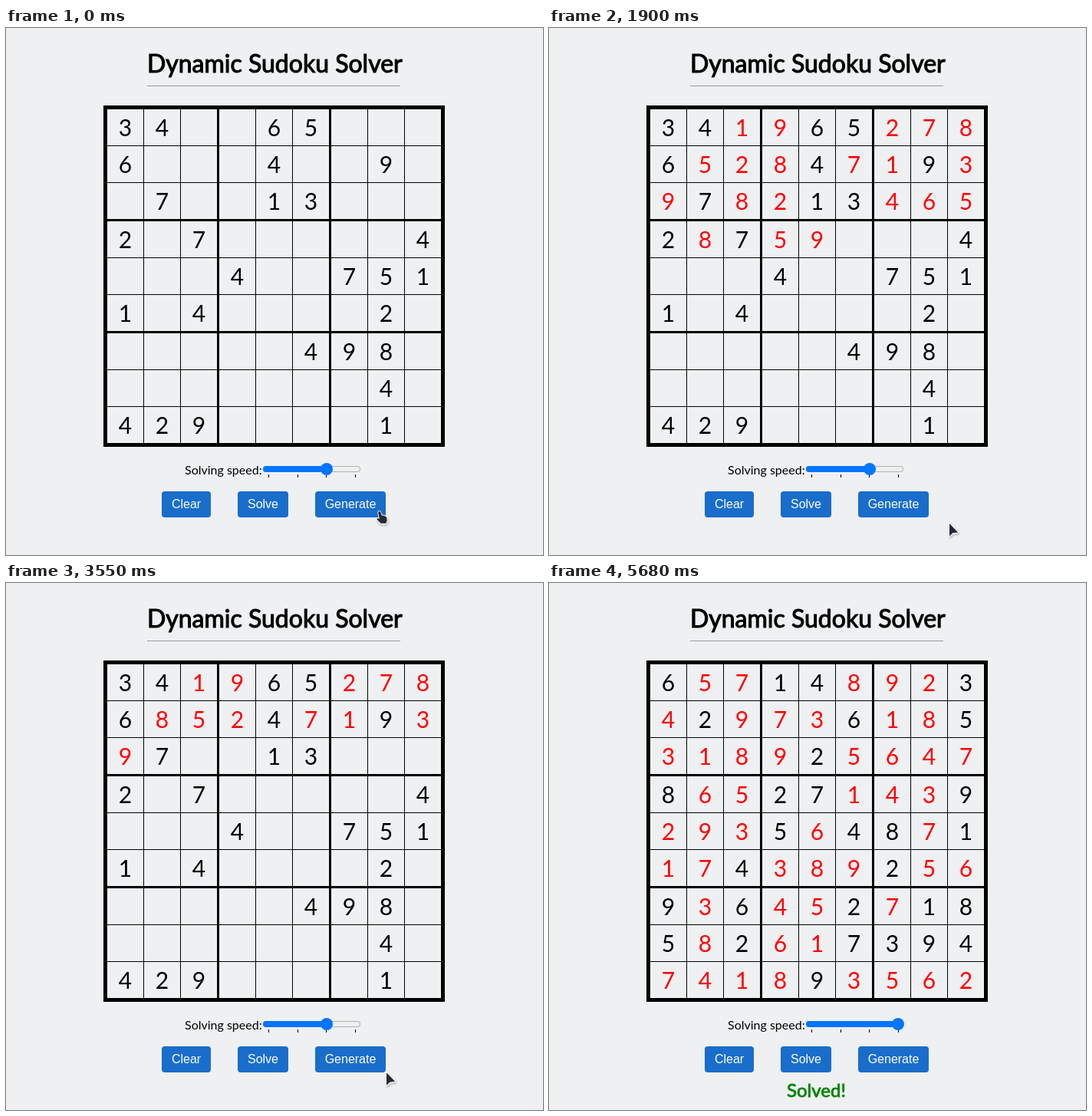
Animation of 700x687 px, one loop 6150 ms. Source, as an HTML page with a canvas:

```html
<!DOCTYPE html>
<html lang="en">
<head>
<meta charset="utf-8">
<title>Dynamic Sudoku Solver</title>
<style>
  html, body { margin: 0; width: 100%; height: 100%; overflow: hidden; background: #eef0f2; }
  canvas { display: block; }
</style>
</head>
<body>
<canvas id="stage" width="700" height="687"></canvas>
<script>
const ctx = document.getElementById('stage').getContext('2d');
const LOOP = 6150;
const SANS = 'Arial, "Liberation Sans", sans-serif';
const LATO = 'Lato, sans-serif';
const BUTTONS = [
  { label: 'Clear', x: 203, w: 64 },
  { label: 'Solve', x: 302, w: 66 },
  { label: 'Generate', x: 403, w: 92 }
];

// Backtracking search in reading order; records every placement and removal.
function makePuzzle(rows, stops = []) {
  const given = [...rows.replace(/\s/g, '')].map(Number);
  const board = given.slice();
  const ops = [];
  const found = stops.map(() => -1);

  const fits = (cell, n) => {
    const r = Math.floor(cell / 9), c = cell % 9;
    const corner = (r - r % 3) * 9 + c - c % 3;
    for (let i = 0; i < 9; i++) {
      if (board[r * 9 + i] === n || board[i * 9 + c] === n) return false;
      if (board[corner + Math.floor(i / 3) * 9 + i % 3] === n) return false;
    }
    return true;
  };
  const put = (cell, n) => {
    board[cell] = n;
    ops.push(cell * 10 + n);
    stops.forEach((s, k) => {
      if (found[k] < 0 && cell === s.length - 1 && board.slice(0, cell + 1).join('') === s) {
        found[k] = ops.length;
      }
    });
  };
  const solve = cell => {
    while (cell < 81 && given[cell]) cell++;
    if (cell === 81) return true;
    for (let n = 1; n <= 9; n++) {
      if (!fits(cell, n)) continue;
      put(cell, n);
      if (solve(cell + 1)) return true;
    }
    if (board[cell]) put(cell, 0);
    return false;
  };
  // A cell is emptied before its next candidate is tested.
  const solveClean = fits;
  solve(0);

  let shownAt = -1, shown = given;
  const boardAt = count => {
    if (count !== shownAt) {
      shown = given.slice();
      for (let i = 0; i < count; i++) shown[Math.floor(ops[i] / 10)] = ops[i] % 10;
      shownAt = count;
    }
    return shown;
  };
  return { given, total: ops.length, found, boardAt };
}

const first = makePuzzle(`
  340065000 600040090 070013000
  207000004 000400751 104000020
  000004980 000000040 429000010`, [
  '341965278652748193978213465287631',
  '3419652786582471939728134652871593',
  '341965278658742193972813465287539'
]);
const second = makePuzzle(`
  600140003 020006005 000020000
  800270009 000504801 004000200
  906002018 502007394 000090000`);

const firstPace = [
  [910, 0], [1300, first.found[0]], [2470, first.found[1]],
  [3160, first.found[2]], [3820, first.total]
];
const secondPace = [[5340, 0], [5650, second.total]];

// Time, x, y of the pointer tip.
const pointerPath = [
  [0, 487, 630], [240, 425, 637], [480, 321, 627], [910, 321, 627],
  [1090, 400, 650], [1300, 508, 673], [1510, 516, 659], [1900, 522, 646],
  [2170, 523, 641], [2470, 523, 641], [3160, 525, 641], [3400, 520, 652],
  [3610, 490, 635], [3880, 432, 577], [4120, 432, 577], [4450, 474, 617],
  [4720, 474, 617], [4890, 432, 577], [4940, 432, 577], [5090, 458, 577],
  [5240, 346, 615], [5370, 346, 615]
];

function track(keys, t, column, ease = k => k) {
  if (t <= keys[0][0]) return keys[0][column];
  for (let i = 1; i < keys.length; i++) {
    const a = keys[i - 1], b = keys[i];
    if (t <= b[0]) return a[column] + (b[column] - a[column]) * ease((t - a[0]) / (b[0] - a[0]));
  }
  return keys[keys.length - 1][column];
}

const smooth = k => k * k * (3 - 2 * k);

function text(str, x, y, font, color, align = 'left') {
  ctx.font = font;
  ctx.fillStyle = color;
  ctx.textAlign = align;
  ctx.fillText(str, x, y);
}

function heavyText(str, x, y, size, color) {
  text(str, x, y, `${size}px ${LATO}`, color);
  ctx.strokeStyle = color;
  ctx.lineWidth = size / 31;
  ctx.lineJoin = 'miter';
  ctx.miterLimit = 4;
  ctx.strokeText(str, x, y);
}

function rounded(x, y, w, h, r, fill) {
  ctx.beginPath();
  ctx.roundRect(x, y, w, h, r);
  ctx.fillStyle = fill;
  ctx.fill();
}

const cellStart = i => 48 * i + 2 * Math.floor(i / 3);

function drawGrid(puzzle, count) {
  const left = 132, top = 106;
  ctx.fillStyle = '#000';
  for (const edge of [0, 440]) {
    ctx.fillRect(127 + edge, 101, 5, 445);
    ctx.fillRect(127, 101 + edge, 445, 5);
  }
  for (let i = 1; i < 9; i++) {
    const width = i % 3 ? 1 : 3;
    const at = cellStart(i) - width;
    ctx.fillRect(left + at, top, width, 435);
    ctx.fillRect(left, top + at, 435, width);
  }
  puzzle.boardAt(count).forEach((n, i) => {
    if (!n) return;
    const x = left + cellStart(i % 9) + 23.5;
    const y = top + cellStart(Math.floor(i / 9)) + 35;
    text(n, x, y, `30px ${LATO}`, puzzle.given[i] ? '#000' : '#f00', 'center');
  });
}

function drawSlider(thumb, state) {
  const look = {
    idle: ['#0075ff', '#0075ff', '#efefef', '#b2b2b2'],
    hover: ['#005cc8', '#0075ff', '#e5e5e5', '#9a9a9a'],
    active: ['#3793ff', '#3793ff', '#f5f5f5', '#c6c6c6']
  }[state];
  text('Solving speed:', 233, 582, `16px ${LATO}`, '#000');
  rounded(335, 571, 127, 8, 4, look[3]);
  rounded(336, 572, 125, 6, 3, look[2]);
  rounded(335, 571, thumb - 335, 8, [4, 0, 0, 4], look[0]);
  ctx.fillStyle = '#000';
  for (const x of [342, 380, 417, 455]) ctx.fillRect(x, 582, 1, 4);
  ctx.beginPath();
  ctx.arc(thumb, 575, 8, 0, Math.PI * 2);
  ctx.fillStyle = look[1];
  ctx.fill();
}

const arrow = new Path2D('M0 0 V16.5 L4.3 12.3 L11.2 11.4 Z');
const hand = new Path2D('M-1.8 1.5 Q-1.5 -.5 .3 0 Q1.5 .3 1.8 2 L2.6 5.6 Q4 4.8 5 6 ' +
  'Q6.6 5.3 7.4 6.8 Q9 6.5 9.3 8.5 L9.6 12 Q9.4 14 8 15.8 H1.6 ' +
  'L-3.3 11 Q-4 9.3 -2.4 9 L-.2 10 Z');

function drawPointer(x, y, shape) {
  ctx.save();
  ctx.translate(x, y);
  ctx.lineJoin = 'round';
  ctx.shadowColor = 'rgba(0,0,0,.3)';
  ctx.shadowBlur = 3;
  ctx.shadowOffsetX = 1;
  ctx.shadowOffsetY = 2;
  ctx.strokeStyle = '#fff';
  ctx.lineWidth = 1.8;
  ctx.stroke(shape);
  ctx.shadowColor = 'transparent';
  ctx.fillStyle = '#232a35';
  ctx.fill(shape);
  ctx.restore();
}

function draw(time) {
  const t = time % LOOP;
  const tick = Math.floor((t - 10) / 30) * 30 + 10;
  const step = t < 480 ? Math.floor(t / 30) * 30 : tick;
  const fresh = t >= 4480;
  const x = track(pointerPath, step, 1, smooth);
  const y = track(pointerPath, step, 2, smooth);
  const visible = t < 5370;
  const overSlider = visible && x >= 335 && x <= 462 && y >= 567 && y <= 583;
  const overButton = y >= 604 && y < 638 && BUTTONS.some(b => x >= b.x && x < b.x + b.w);
  const pressed = t >= 4900 && t < 5100;

  ctx.fillStyle = '#eef0f2';
  ctx.fillRect(0, 0, 700, 687);
  heavyText('Dynamic Sudoku Solver', 184, 58, 32, '#000');
  ctx.fillStyle = '#9a9a9a';
  ctx.fillRect(184, 75, 330, 1);

  const pace = fresh ? secondPace : firstPace;
  drawGrid(fresh ? second : first, Math.round(track(pace, tick, 1)));
  drawSlider(t < 5000 ? 418 : 455, pressed ? 'active' : overSlider ? 'hover' : 'idle');
  for (const b of BUTTONS) {
    rounded(b.x, 604, b.w, 34, 4, '#196dcb');
    text(b.label, b.x + b.w / 2, 626, `16px ${SANS}`, '#fff', 'center');
  }
  if ((t >= 3820 && !fresh) || t >= 5680) heavyText('Solved!', 310, 670, 24, '#008000');
  if (visible) drawPointer(x, y, overButton ? hand : arrow);
}

function frame() {
  draw(performance.now());
  requestAnimationFrame(frame);
}
frame();
</script>
</body>
</html>
```
